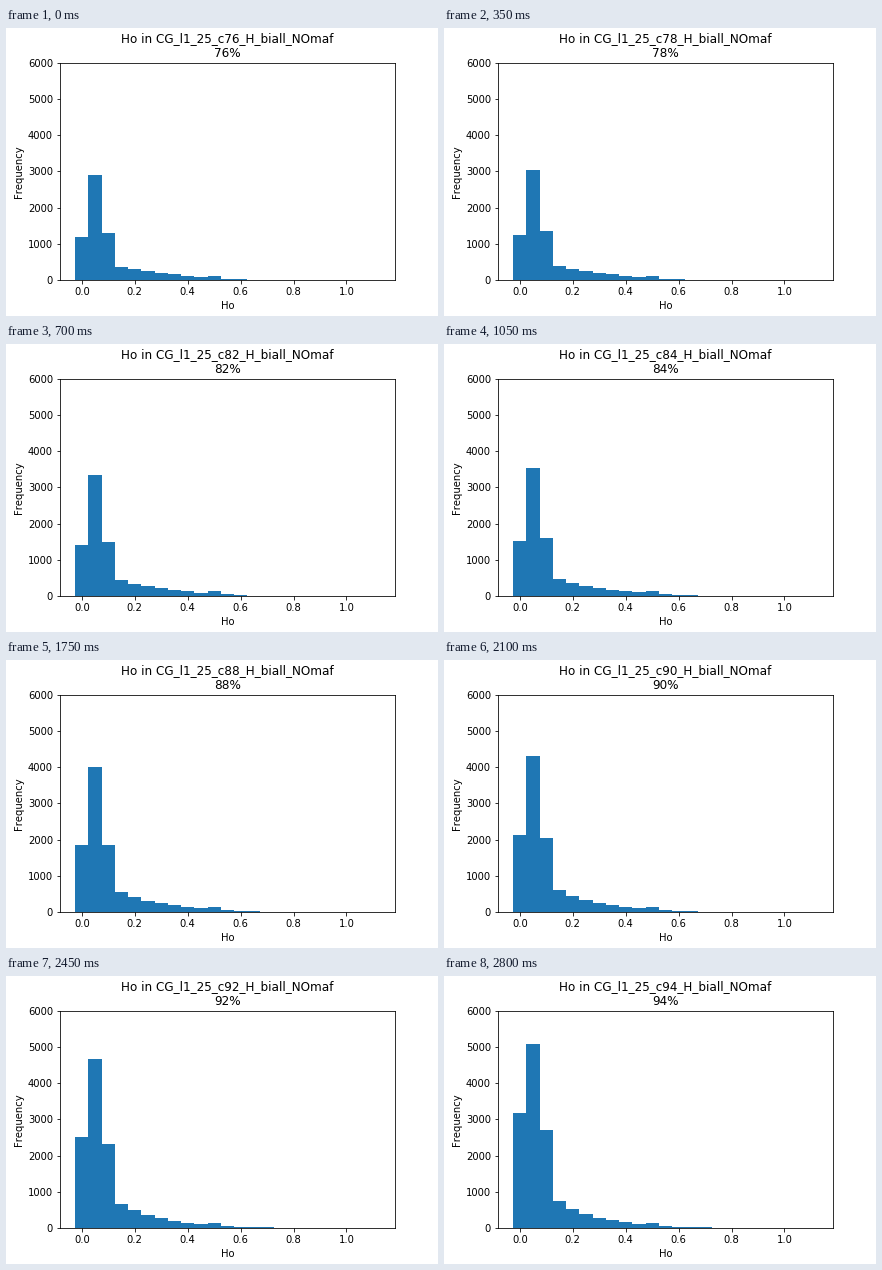
A matplotlib script for the animation above (3.15 s loop, 432 by 288 pixels).

```python
import numpy as np
import matplotlib.pyplot as plt
from matplotlib.animation import FuncAnimation

plt.rcParams["text.kerning_factor"] = 6

LEVELS = [76, 78, *range(82, 96, 2)]
BIN = 0.05
centers = np.arange(15) * BIN

# First three bins: start count, end count, steepness of growth.
PEAKS = [(1190, 3170, 3), (2900, 5090, 1), (1300, 2700, 2)]


def growth(level, steep):
    """Hyperbolic ease-in from 0 at the first level to 1 at the last."""
    u = (level - LEVELS[0]) / (LEVELS[-1] - LEVELS[0])
    return u / (1 + steep * (1 - u))


def heights(level):
    peaks = [a + (b - a) * growth(level, k) for a, b, k in PEAKS]
    d = centers[len(PEAKS):] - 0.15
    tail = 355 * np.clip(1 - d / 0.6, 0, 1) ** 2
    tail += growth(level, 1) * (380 * np.exp(-d / 0.09) + 15)
    tail[np.isclose(d, 0.35)] += 60  # bump at one half
    return np.concatenate([peaks, tail])


def title(level):
    return f"Ho in CG_l1_25_c{level}_H_biall_NOmaf\n{level}%"


fig, ax = plt.subplots(figsize=(6, 4), dpi=72)
fig.subplots_adjust(left=0.125, right=0.9, bottom=0.125, top=0.88)
bars = ax.bar(centers, heights(LEVELS[0]), width=BIN, color="C0")
ax.set_xlim(-0.0825, 1.1825)
ax.set_ylim(0, 6000)
ax.set_xlabel("Ho")
ax.set_ylabel("Frequency")
heading = ax.set_title(title(LEVELS[0]))


def update(i):
    level = LEVELS[i]
    for bar, h in zip(bars, heights(level)):
        bar.set_height(h)
    heading.set_text(title(level))
    return [*bars, heading]


anim = FuncAnimation(fig, update, frames=len(LEVELS), interval=350,
                     repeat=True, repeat_delay=0)
plt.show()
```
